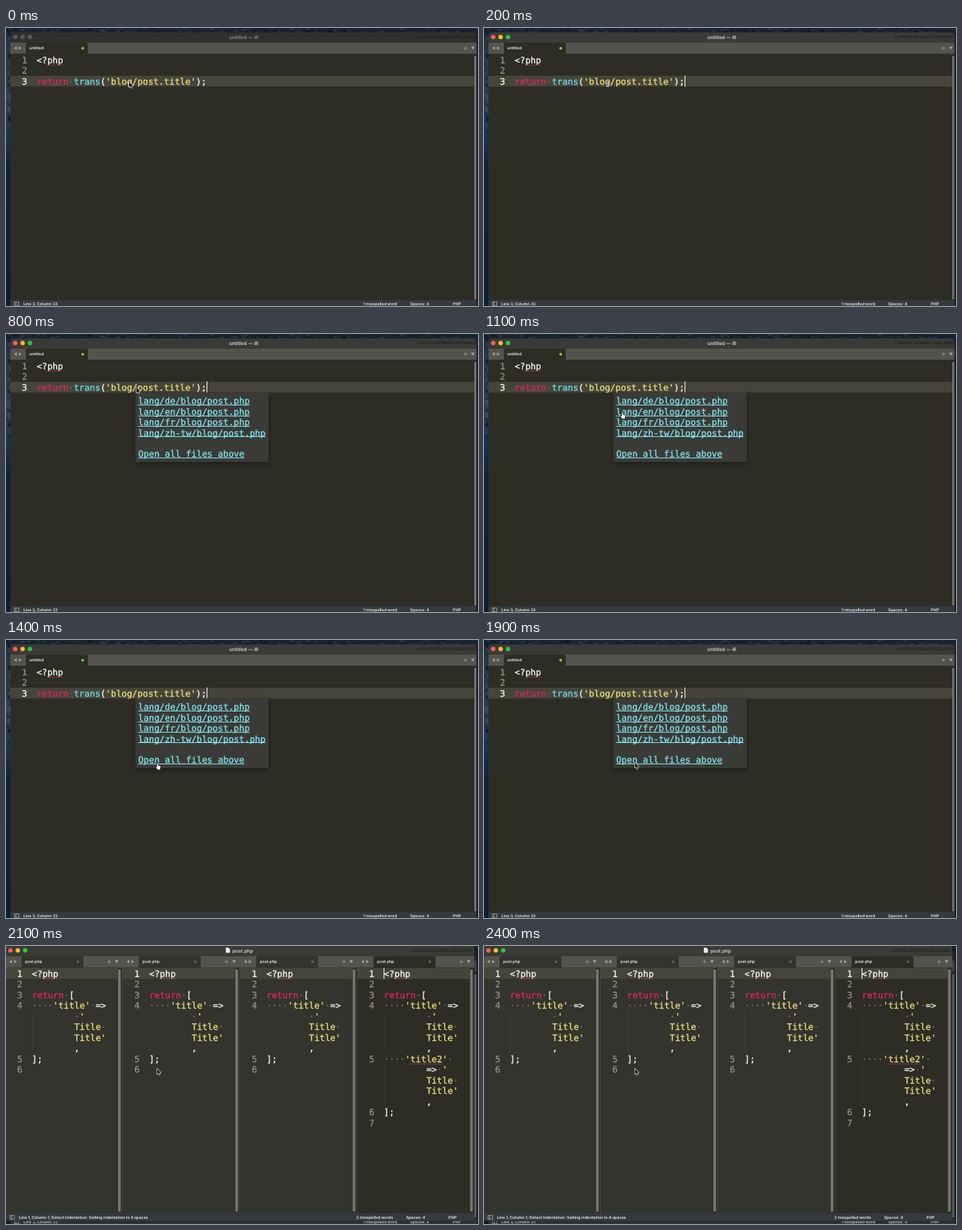
An HTML page with a canvas for the animation above (2500 ms loop, 640x378 px).

```html
<!DOCTYPE html>
<html lang="en">
<head>
<meta charset="utf-8">
<title>Editor</title>
<style>
html, body { margin: 0; width: 100%; height: 100%; overflow: hidden; background: #101c2a; }
canvas { display: block; width: 640px; height: 378px; }
</style>
</head>
<body>
<canvas id="stage" width="640" height="378"></canvas>
<script>
const ctx = document.getElementById('stage').getContext('2d');
ctx.textRendering = 'geometricPrecision';
const LOOP = 2500;
const MONO = '11.96px "DejaVu Sans Mono", monospace';
const CH = 7.2, ROW = 14.5;
const C = {
  bg: '#2d2d26', pane: '#34342e', line: '#46453a', title: '#3a3a36', titleOff: '#30302c',
  tabs: '#54544e', status: '#353a3e', popup: '#3a3b36', bar: '#787871',
  white: '#f8f8f2', dim: '#90908a', faint: '#6c6a5c',
  pink: '#e2245f', cyan: '#6cdcee', link: '#84e2f0', yellow: '#ece07c', red: '#b3404c', icon: '#a9a9a4'
};

function rect(x, y, w, h, color) {
  ctx.fillStyle = color;
  ctx.fillRect(x, y, w, h);
}

function dot(x, y, r, color) {
  ctx.fillStyle = color;
  ctx.beginPath();
  ctx.arc(x, y, r, 0, Math.PI * 2);
  ctx.fill();
}

function poly(points, fill, stroke, width = 1) {
  ctx.beginPath();
  points.forEach(([x, y]) => ctx.lineTo(x, y));
  ctx.closePath();
  if (stroke) {
    ctx.strokeStyle = stroke;
    ctx.lineWidth = width;
    ctx.lineJoin = 'round';
    ctx.stroke();
  }
  ctx.fillStyle = fill;
  ctx.fill();
}

function stroke(color, width, ...segments) {
  ctx.strokeStyle = color;
  ctx.lineWidth = width;
  ctx.beginPath();
  for (const [x1, y1, x2, y2] of segments) {
    ctx.moveTo(x1, y1);
    ctx.lineTo(x2, y2);
  }
  ctx.stroke();
}

// Interface label, vertically centred on y
function label(s, x, y, size = 5.35, color = '#eeeeea', weight = 600, align = 'left') {
  ctx.font = `${weight} ${size}px Inter, sans-serif`;
  ctx.textAlign = align;
  ctx.fillStyle = color;
  ctx.fillText(s, x, y + size * 0.36);
}

// Code made of [text, color] pieces, vertically centred on y and slightly emboldened
function code(x, y, ...pieces) {
  ctx.font = MONO;
  ctx.textAlign = 'left';
  ctx.lineWidth = 0.3;
  ctx.lineJoin = 'round';
  for (const [s, color] of pieces) {
    ctx.fillStyle = ctx.strokeStyle = color;
    ctx.fillText(s, x, y + 4.2);
    ctx.strokeText(s, x, y + 4.2);
    x += s.length * CH;
  }
}

function misspelled(x, y, chars) {
  ctx.setLineDash([2, 1]);
  stroke(C.red, 1, [x, y + 7, x + chars * CH, y + 7]);
  ctx.setLineDash([]);
}

function openTag(x, y) {
  code(x, y, ['<?php', C.white]);
  misspelled(x + 2 * CH, y, 3);
}

function lights(x, y, on) {
  ['#fe5f57', '#febc2e', '#28c840'].forEach((c, i) => dot(x + i * 10, y, 3, on ? c : '#575752'));
}

function navArrows(x, y) {
  poly([[x - 2, y], [x + 1.6, y - 2.3], [x + 1.6, y + 2.3]], C.icon);
  poly([[x + 8.2, y], [x + 4.6, y - 2.3], [x + 4.6, y + 2.3]], C.icon);
}

function tabMenu(x, y) {
  stroke(C.icon, 0.7, [x - 2.3, y, x + 2.3, y], [x, y - 2.3, x, y + 2.3]);
  poly([[x + 7.5, y - 1.9], [x + 12.5, y - 1.9], [x + 10, y + 2]], C.icon);
}

function tab(x, y, w, h, color) {
  ctx.fillStyle = color;
  ctx.beginPath();
  ctx.roundRect(x, y, w, h, [2, 2, 0, 0]);
  ctx.fill();
}

function statusIcon(x, y) {
  ctx.strokeStyle = '#b9bcbc';
  ctx.lineWidth = 0.7;
  ctx.strokeRect(x, y - 2.5, 6, 5);
  stroke('#b9bcbc', 0.7, [x + 2, y - 2.5, x + 2, y + 2.5]);
}

// Dark blue rock with soft seeded flecks
function wallpaper() {
  const g = ctx.createLinearGradient(0, 0, 0, 378);
  [[0, '#172635'], [0.08, '#26384a'], [0.25, '#2c4258'], [0.36, '#1d3856'], [0.5, '#10233a'], [1, '#0d1d32']]
    .forEach(([p, c]) => g.addColorStop(p, c));
  rect(0, 0, 640, 378, g);
  rect(0, 0, 640, 6, '#172432');
  rect(638, 6, 2, 372, '#171e27');
  let seed = 7;
  const rnd = () => (seed = seed * 16807 % 2147483647) / 2147483647;
  for (let i = 0; i < 160; i++) {
    const tone = rnd() < 0.5 ? 'rgba(90,110,130,0.22)' : 'rgba(5,10,18,0.3)';
    rect(rnd() * 640, rnd() * 6, 2 + rnd() * 5, 1 + rnd() * 2, tone);
    if (i % 4 === 0) rect(rnd() * 5, rnd() * 140, 1 + rnd() * 3, 2 + rnd() * 5, tone);
  }
}

function mainWindow(on) {
  ctx.save();
  ctx.beginPath();
  ctx.roundRect(6, 6, 632, 380, 5);
  ctx.clip();
  rect(6, 6, 632, 372, C.bg);
  rect(6, 6, 632, 14, on ? C.title : C.titleOff);
  lights(12.5, 12.2, on);
  label('untitled — l8', 322.5, 12.2, 6.5, on ? '#d4d4d0' : '#8e8e89', 600, 'center');
  label('LICENSE UPGRADE REQUIRED', 637, 12.2, 5.5, on ? '#20201d' : '#1d1d1a', 500, 'right');

  rect(6, 20, 632, 15, C.tabs);
  tab(27, 20, 84, 16, C.bg);
  navArrows(13, 27.3);
  tabMenu(623, 27.3);
  label('untitled', 31.5, 27.5);
  dot(104, 27.6, 1.8, '#7fdc38');

  rect(6, 65, 629, 14.5, C.line);
  rect(635, 38, 2.6, 331, C.bar);
  [43.5, 58, 72.5].forEach((y, i) => code(21.5, y, [String(i + 1), i === 2 ? C.white : C.dim]));
  openTag(41.5, 43.5);
  code(41.5, 72.5, ['return', C.pink], ['·', C.faint], ['trans', C.cyan], ['(', C.white],
    ["'blog/post.title'", C.yellow], [');', C.white]);
  if (on) rect(272, 64.5, 1, 15.5, C.white);

  rect(6, 370, 632, 8, C.status);
  statusIcon(11.5, 375);
  label('Line 3, Column 33', 23.5, 375.2);
  label('1 misspelled word', 484.5, 375.2);
  label('Spaces: 4', 548, 375.2);
  label('PHP', 606, 375.2);
  ctx.restore();
}

function popup() {
  ctx.save();
  ctx.shadowColor = 'rgba(0,0,0,0.45)';
  ctx.shadowBlur = 7;
  ctx.shadowOffsetY = 2;
  rect(175.5, 79.5, 180.5, 94.5, C.popup);
  ctx.restore();
  const links = ['de', 'en', 'fr', 'zh-tw'].map(l => `lang/${l}/blog/post.php`);
  [...links, '', 'Open all files above'].forEach((s, i) => {
    const y = 91.2 + i * 14.4;
    code(179.3, y, [s, C.link]);
    if (s) rect(179.3, Math.round(y + 5), s.length * CH, 1, C.link);
  });
}

function entry(x, y, key, wrapArrow) {
  const gap = ['·', C.faint], arrow = ['=>', C.white];
  const in8 = x + 8 * CH;
  code(x, y, ['····', C.faint], [`'${key}'`, C.yellow], gap, ...(wrapArrow ? [] : [arrow]));
  code(in8, y + ROW, ...(wrapArrow ? [arrow] : []), gap, ["'", C.yellow]);
  code(in8, y + 2 * ROW, ['Title', C.yellow], gap);
  code(in8, y + 3 * ROW, ["Title'", C.yellow]);
  code(in8, y + 4 * ROW, [',', C.white]);
  if (wrapArrow) misspelled(x + 5 * CH, y, key.length);
  ctx.setLineDash([1, 1]);
  stroke('#55554c', 0.7, [x + 0.5, y + 7, x + 0.5, y + 4.5 * ROW]);
  ctx.setLineDash([]);
}

function paneCode(x, last) {
  const left = x + 35, row = n => 37.3 + n * ROW;
  const rows = last ? [0, 1, 2, 3, 8, 13, 14] : [0, 1, 2, 3, 8, 9];
  rows.forEach((r, i) => code(x + 15, row(r), [String(i + 1), i ? C.dim : C.white]));
  openTag(left, row(0));
  code(left, row(2), ['return', C.pink], ['·', C.faint], ['[', C.white]);
  entry(left, row(3), 'title', false);
  if (last) entry(left, row(8), 'title2', true);
  code(left, row(last ? 13 : 8), ['];', C.white]);
}

function splitWindow(loaded) {
  ctx.save();
  ctx.shadowColor = 'rgba(0,0,0,0.6)';
  ctx.shadowBlur = 6;
  ctx.fillStyle = C.pane;
  ctx.beginPath();
  ctx.roundRect(0, -6, 635, 380, 4);
  ctx.fill();
  ctx.shadowColor = 'transparent';
  ctx.clip();

  rect(0, 0, 635, 14, C.title);
  lights(6, 6, true);
  poly([[298, 2.3], [301.5, 2.3], [303.7, 4.5], [303.7, 9.3], [298, 9.3]], '#ededed');
  label('post.php', 307, 6.2, 6.5, '#d4d4d0');
  label('LICENSE UPGRADE REQUIRED', 631.5, 6.2, 5.5, '#20201d', 500, 'right');
  rect(0, 14, 635, 15.5, C.tabs);

  for (let i = 0; i < 4; i++) {
    const x = i * 159.1, last = i === 3, bg = last ? C.bg : C.pane;
    rect(x - 1, 29.5, 158, 335, bg);
    tab(x + 21, 14, 84, 16, bg);
    navArrows(x + 6.5, 21.3);
    label('post.php', x + 26, 21.5);
    stroke(C.icon, 0.7, [x + 95.8, 19.8, x + 99, 23], [x + 99, 19.8, x + 95.8, 23]);
    tabMenu(x + 140, 21.3);
    if (loaded || i === 0) rect(x - 1, 30, 152.5, 14.7, C.line);
    rect(x + 152, 32, 3.5, 329, C.bar);
    if (!last) {
      rect(x + 156, 29.5, 2, 335, '#24241f');
      rect(x + 157.2, 29.5, 1, 335, '#55554f');
    }
    if (loaded) paneCode(x, last);
  }
  if (loaded) rect(512, 30, 1, 15, C.white);
  else code(15, 37.3, ['1', C.white]);

  rect(0, 363.5, 635, 11, C.status);
  statusIcon(5.5, 369);
  label('Line 1, Column 1' + (loaded ? '; Detect Indentation: Setting indentation to 4 spaces' : ''), 17.5, 369.2);
  label(`${loaded ? 2 : 0} misspelled words`, 475, 369.2);
  label('Spaces: 4', 542.5, 369.2);
  label('PHP', 600, 369.2);
  ctx.restore();
}

const shift = (points, x, y) => points.map(([a, b]) => [a + x, b + y]);
const ARROW = [[0, 0], [0, 7], [1.6, 5.6], [2.8, 8.2], [3.9, 7.7], [2.8, 5.2], [4.9, 5]];
const HAND = [[0, 0.5], [1.2, 0.2], [1.6, 3], [4.3, 3.7], [4.7, 5], [4, 8.4], [0.8, 8.4], [-1.8, 5], [-1, 4.5], [0.2, 5.5]];

function pointer(kind, x, y) {
  if (kind === 'beam') {
    const marks = [[x, y - 3, x, y + 3], [x - 1.7, y - 4.2, x, y - 3], [x + 1.7, y - 4.2, x, y - 3],
      [x - 1.7, y + 4.2, x, y + 3], [x + 1.7, y + 4.2, x, y + 3]];
    stroke('#f0f0f0', 2, ...marks);
    stroke('#222', 0.8, ...marks);
  } else if (kind === 'hand') {
    poly(shift(HAND, x, y + 0.8), '#fff', '#111', 1.1);
  } else {
    poly(shift(ARROW, x, y), '#0a0a0a', '#f4f4f4', 1.2);
  }
}

const ease = p => p * p * (3 - 2 * p);
const span = (t, a, b) => ease(Math.min(1, Math.max(0, (t - a) / (b - a))));

function drawPointer(t) {
  if (t < 200) return pointer('arrow', 167, 73.5);
  if (t < 700) return pointer('beam', 168 + 8.3 * span(t, 200, 400), 75 - 2.5 * span(t, 200, 400));
  const p = span(t, 900, 1400);
  const x = 177 + 27.8 * p, y = 72.8 + 94.2 * p;
  const overLink = t < 1900 && y > 84 && (y < 142 || y > 156);
  pointer(overLink ? 'hand' : 'arrow', x, y);
}

function draw(t) {
  const split = t >= 2000;
  wallpaper();
  mainWindow(t >= 200 && !split);
  if (t >= 700 && !split) popup();
  if (split) splitWindow(t >= 2100);
  drawPointer(t);
}

function frame() {
  draw(Math.floor(performance.now() % LOOP / 100) * 100);
  requestAnimationFrame(frame);
}
frame();
</script>
</body>
</html>
```
